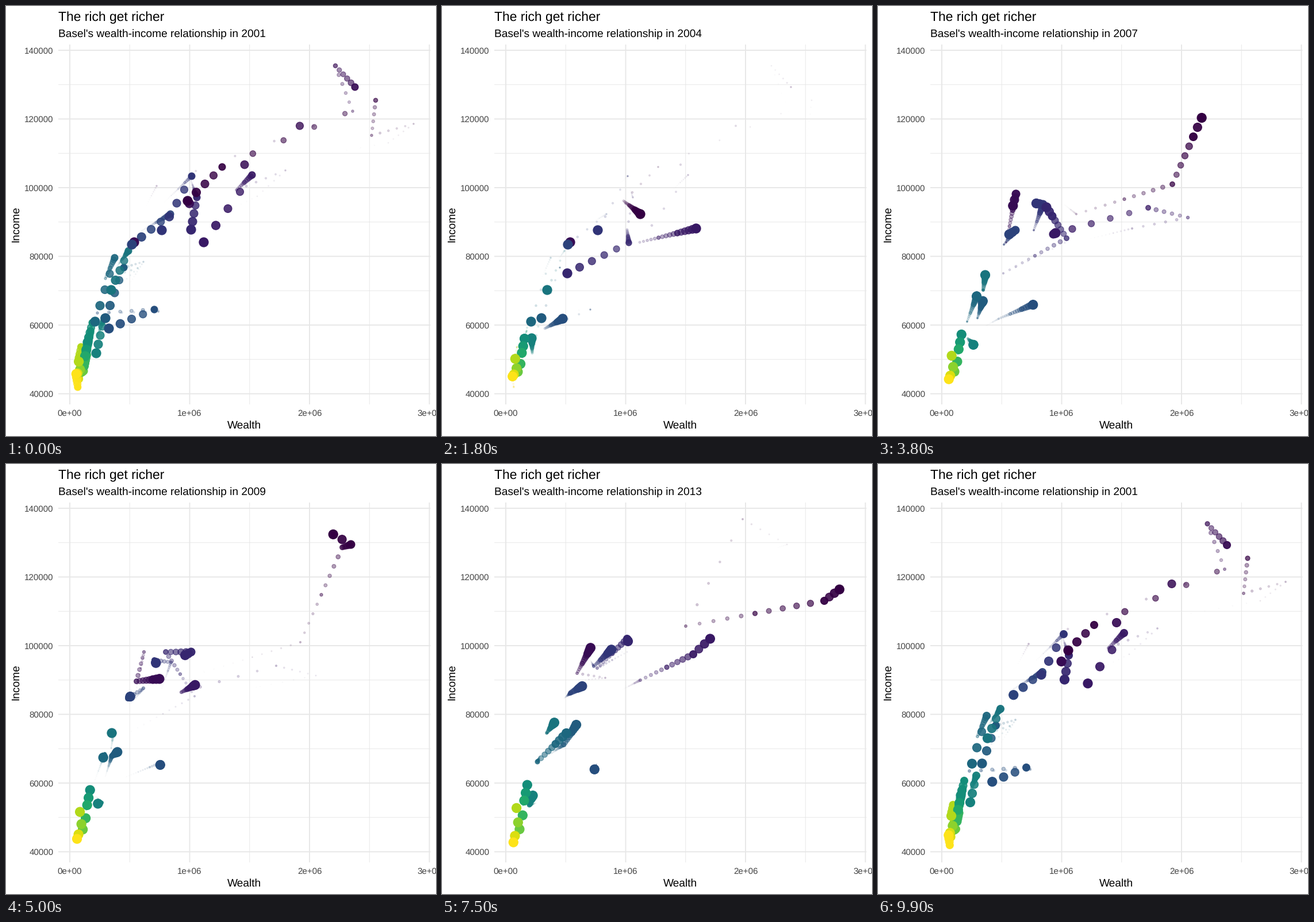
These frames come from a looping animation (748 px wide and 748 px high, 10000 ms). A matplotlib script:

```python
import numpy as np
import matplotlib.pyplot as plt
from matplotlib.animation import FuncAnimation

SIZE, DPI = 748, 88
PT = 72 / DPI                      # points per pixel
FRAMES, STEP, YEARS = 100, 6, 17   # one held frame and five moving ones per year
WAKE = 40
GRID, TICK = "#e7e7e7", "#444444"

plt.rcParams["font.family"] = ["Liberation Sans", "DejaVu Sans"]
plt.rcParams["text.hinting"] = "none"
viridis = plt.get_cmap("viridis")
year_index = np.arange(YEARS)
tracks, colours = [], []


def district(rank, *turns):
    """Straight runs between turning points (year, x, y)."""
    t, x, y = zip(*turns)
    tracks.append(np.column_stack([np.interp(year_index, t, x),
                                   np.interp(year_index, t, y)]))
    colours.append(np.array(viridis(rank / 20)[:3]) ** 1.2)


# The rich districts roam widely.
district(0, (0, 316, 339), (3, 345, 362), (5, 512, 310), (7, 585, 145),
         (8, 600, 140), (9, 523, 96), (10, 424, 282), (12, 665, 238),
         (13, 709, 205), (14, 636, 225), (15, 643, 164), (16, 376, 280))
district(1, (3, 223, 411), (6, 240, 327), (7, 227, 378), (9, 284, 372),
         (10, 235, 364), (13, 262, 313), (14, 603, 183), (15, 573, 104),
         (16, 607, 141))
district(2, (0, 344, 411), (3, 442, 387), (4, 539, 368), (5, 470, 351),
         (6, 305, 397), (10, 345, 376), (12, 437, 331), (13, 486, 286),
         (14, 401, 320), (16, 428, 294))
district(3, (0, 322, 389), (2, 325, 412), (3, 218, 465), (5, 328, 404),
         (7, 278, 327), (8, 322, 327), (10, 270, 355), (12, 322, 304),
         (16, 332, 333))

# The middle ones change direction only now and then.
district(4, (3, 271, 390), (6, 287, 345), (7, 258, 341), (10, 264, 352), (15, 323, 296))
district(5, (3, 219, 415), (6, 239, 390), (7, 212, 408), (11, 224, 398), (16, 286, 362))
district(6, (0, 179, 561), (3, 210, 544), (6, 270, 519), (13, 265, 532),
         (14, 159, 534), (15, 258, 528))
district(7, (3, 173, 543), (7, 184, 508), (11, 212, 488), (13, 239, 445), (14, 205, 455))
district(8, (3, 155, 549), (6, 172, 504), (11, 166, 518), (13, 229, 456),
         (14, 173, 474), (16, 189, 438))
district(9, (4, 183, 494), (6, 187, 468), (10, 182, 468), (16, 213, 426))
district(10, (0, 157, 604), (3, 156, 578), (6, 167, 589), (11, 152, 593), (16, 171, 542))

# The poor ones start close together and slowly spread out in income.
slots = [11, 12, 13, 18, 14, 17, 16, 19, 20]
for rank in sorted(slots):
    slot, gap = slots.index(rank), rank - 11
    district(rank,
             (0, 142 - 2.2 * gap, 640 - 55 * (1 - slot / 8) ** 2),
             (16, 150 - 2.8 * gap, 551 + 14 * slot))

tracks = np.array(tracks)
colours = np.array(colours)


def moving_steps(state):
    return 4 if state == YEARS - 1 else 5


def positions(frame):
    state, k = divmod(frame, STEP)
    start, end = tracks[:, state], tracks[:, (state + 1) % YEARS]
    return start + (end - start) * k / moving_steps(state)


def year(frame):
    state, k = divmod(frame, STEP)
    passed = k > (moving_steps(state) + 1) // 2
    return 2001 + (state + passed) % YEARS


path = np.array([positions(f) for f in range(FRAMES)])

fig = plt.figure(figsize=(SIZE / DPI, SIZE / DPI), dpi=DPI, facecolor="white")
ax = fig.add_axes([0, 0, 1, 1])
ax.set(xlim=(0, SIZE), ylim=(SIZE, 0))
ax.axis("off")


def label(x, y, text, size, color="black", **kw):
    return ax.text(x, y, text, fontsize=size * PT, color=color,
                   va="baseline", **kw)


def grid_line(xs, ys, minor):
    ax.plot(xs, ys, color=GRID, lw=(0.95 if minor else 1.85) * PT,
            solid_capstyle="butt", snap=False, zorder=1)


LEFT, RIGHT, TOP, BOTTOM = 91, 738.4, 67, 693
for i in range(7):
    x = 111 + 104.25 * i
    grid_line([x, x], [TOP, BOTTOM], i % 2)
    if i % 2 == 0:
        label(x, 713, f"{i // 2}e+0{6 if i else 0}", 15.2, TICK, ha="center")
for i in range(11):
    y = 77 + 59.75 * i
    grid_line([LEFT, RIGHT], [y, y], i % 2)
    if i % 2 == 0:
        label(82.5, y + 5.4, str(140000 - 10000 * i), 15.2, TICK, ha="right")

label(91, 26, "The rich get richer", 22.85)
subtitle = label(91, 54, "", 19.1)
label(414.5, 735, "Wealth", 19.1, ha="center")
label(22.5, 380, "Income", 19.1, ha="center", rotation=90, rotation_mode="anchor")

# The wake runs from oldest to newest, so only the places change over time.
ages = np.arange(WAKE - 1, -1, -1)
fade = np.repeat((1 - ages / WAKE) ** 3, len(tracks))
radius = 7.39 * fade + 0.61
rgba = np.column_stack([np.tile(colours, (WAKE, 1)), fade])
dots = ax.scatter(np.zeros(len(fade)), np.zeros(len(fade)),
                  s=(2 * radius * PT) ** 2, facecolors=rgba, edgecolors=rgba,
                  linewidths=1.23 * PT, zorder=3)


def update(frame):
    dots.set_offsets(path[(frame - ages) % FRAMES].reshape(-1, 2))
    subtitle.set_text(f"Basel's wealth-income relationship in {year(frame)}")
    return dots, subtitle


anim = FuncAnimation(fig, update, frames=FRAMES, interval=100,
                     repeat=True, repeat_delay=0, blit=False)
plt.show()
```
